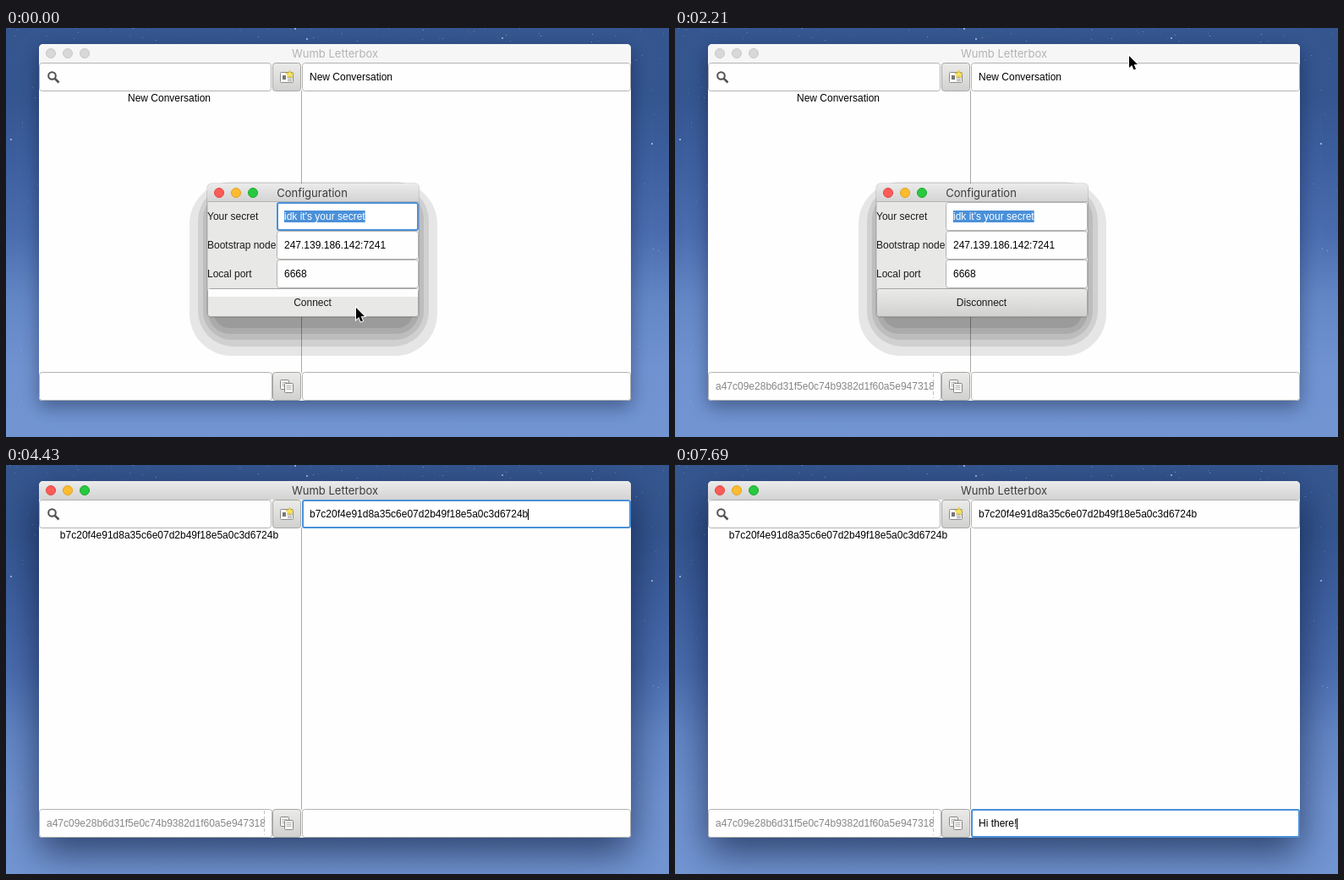
Animation, 784 px wide and 484 px high, one loop 8 s. Source, as an HTML page with a canvas:

```html
<!DOCTYPE html>
<html lang="en">
<head>
<meta charset="utf-8">
<title>Messenger demo</title>
<style>
html, body { margin: 0; width: 100%; height: 100%; overflow: hidden; }
canvas { display: block; }
</style>
</head>
<body>
<canvas id="stage" width="784" height="484"></canvas>
<script>
const ctx = document.getElementById('stage').getContext('2d');
const LOOP = 8000;
const BODY = '12px "Liberation Sans", Arial, sans-serif';
const TITLE = '13px Inter, Roboto, sans-serif';
const BLUE = '#4a90d9';
const APP = 'Wumb Letterbox';
const NODE = '247.139.186.142:7241';
const OWN_KEY = 'a47c09e28b6d31f5e0c74b9382d1f60a5e947318';
const PEER_KEY = 'b7c20f4e91d8a35c6e07d2b49f18e5a0c3d6724b';
const NEW = 'New Conversation';

// [start, x, y, kind]
const pointerSteps = [
  [0, 414, 331, 'arrow'],
  [1330, 425, 349, 'arrow'], [1480, 455, 325, 'arrow'], [1620, 510, 250, 'arrow'],
  [1770, 548, 165, 'arrow'], [1920, 555, 90, 'arrow'], [2060, 545, 48, 'arrow'],
  [2210, 537, 33, 'arrow'],
  [2800, 532, 38, 'arrow'], [2950, 524, 55, 'beam'], [3100, 519, 62, 'beam'],
  [3390, 457, 59, 'beam'], [3540, 395, 60, 'beam'], [3680, 335, 60, 'beam'],
  [3830, 316, 60, 'beam'], [3980, 312, 60, 'beam'],
  [4430, 0, 0, 'none'],
  [5020, 326, 130, 'arrow'], [5170, 350, 300, 'arrow'], [5320, 366, 407, 'arrow'],
  [5470, 366, 421, 'beam'],
  [6350, 0, 0, 'none']
];

// [start, typed text]
const typing = [
  [0, ''], [6350, 'H'], [6500, 'Hi'], [6650, 'Hi t'], [6790, 'Hi th'],
  [6940, 'Hi ther'], [7090, 'Hi there'], [7690, 'Hi there!']
];

const stepAt = (steps, t) => steps.filter(s => s[0] <= t).pop();

function gradient(y0, y1, ...colors) {
  const g = ctx.createLinearGradient(0, y0, 0, y1);
  colors.forEach((c, i) => g.addColorStop(i / (colors.length - 1), c));
  return g;
}

function box(x, y, w, h, r, fill, stroke, width = 1) {
  ctx.beginPath();
  ctx.roundRect(x, y, w, h, r);
  if (fill) { ctx.fillStyle = fill; ctx.fill(); }
  if (stroke) { ctx.strokeStyle = stroke; ctx.lineWidth = width; ctx.stroke(); }
}

function line(color, width, ...pts) {
  ctx.beginPath();
  pts.forEach(([x, y]) => ctx.lineTo(x, y));
  ctx.strokeStyle = color;
  ctx.lineWidth = width;
  ctx.stroke();
}

function text(str, x, y, color = '#000', align = 'left', font = BODY) {
  ctx.font = font;
  ctx.textAlign = align;
  ctx.fillStyle = color;
  ctx.fillText(str, x, y);
}

function entry(x, y, w, h, focused) {
  if (focused) box(x + 1, y + 1, w - 2, h - 2, 2, '#fff', BLUE, 2);
  else box(x + .5, y + .5, w - 1, h - 1, 3, '#fefefe', '#b2b2b0');
}

function button(x, y, w, h, fill) {
  box(x + .5, y + .5, w - 1, h - 1, 3, fill || gradient(y, y + h, '#ebebea', '#dededd', '#d0d1cf'), '#a5a6a4');
}

function selected(str, x, baseline) {
  ctx.font = BODY;
  ctx.fillStyle = BLUE;
  ctx.fillRect(x, baseline - 11, ctx.measureText(str).width, 14);
  text(str, x, baseline, '#fff');
}

function caret(x, y) {
  ctx.fillStyle = '#000';
  ctx.fillRect(Math.round(x), y, 1, 13);
}

function lights(x, y, active) {
  const fills = active ? ['#fc5b57', '#fdbc2e', '#28c840'] : ['#d8d8d8', '#d8d8d8', '#d8d8d8'];
  const rims = active ? ['#e2463f', '#e0a123', '#1aab29'] : ['#c8c8c8', '#c8c8c8', '#c8c8c8'];
  fills.forEach((f, i) => box(x + i * 20 - 5.5, y - 5.5, 11, 11, 5.5, f, rims[i]));
}

function sky() {
  ctx.fillStyle = gradient(0, 484, '#35558f', '#34558f', '#3e5f9f', '#4a6cae', '#6386c5', '#7092d0', '#7295d2');
  ctx.fillRect(0, 0, 784, 484);
  let seed = 29;
  const rnd = () => (seed = (seed * 16807) % 2147483647) / 2147483647;
  for (let i = 0; i < 420; i++) {
    const x = rnd() * 784, y = rnd() * rnd() * 450, a = rnd();
    ctx.fillStyle = `rgba(200,218,250,${.1 + .6 * a * a * a})`;
    const size = a > .94 ? 2 : 1;
    ctx.fillRect(Math.floor(x), Math.floor(y), size, size);
  }
}

function contactIcon() {
  box(324.5, 52.5, 15, 12, 1, '#fafafa', '#8b8c8a');
  ctx.fillStyle = '#777';
  ctx.fillRect(327, 56, 4, 5);
  for (const y of [58.5, 60.5, 62.5]) line('#999', 1, [333, y], [338, y]);
  ctx.beginPath();
  for (let i = 0; i < 10; i++) {
    const r = i % 2 ? 2.2 : 5, a = i * Math.PI / 5 - Math.PI / 2;
    ctx.lineTo(335.5 + r * Math.cos(a), 55 + r * Math.sin(a));
  }
  ctx.closePath();
  ctx.fillStyle = '#f8e45c';
  ctx.fill();
  ctx.strokeStyle = '#d8bd28';
  ctx.lineWidth = .7;
  ctx.stroke();
}

function copyIcon() {
  for (const [x, y] of [[324.5, 416.5], [329.5, 420.5]]) {
    box(x, y, 10, 11, 1, '#f8f8f8', '#858684');
    for (let i = 0; i < 3; i++) line('#b4b5b3', 1, [x + 2, y + 3 + i * 2], [x + 8, y + 3 + i * 2]);
  }
}

function mainWindow(t) {
  const active = t >= 2510;
  ctx.save();
  ctx.shadowColor = active ? 'rgba(0,10,40,.6)' : 'rgba(0,10,40,.4)';
  ctx.shadowBlur = active ? 46 : 22;
  ctx.shadowOffsetY = active ? 18 : 8;
  box(39, 19, 700, 422, [5, 5, 4, 4], '#fefefe');
  ctx.restore();

  box(39, 19, 700, 22, [5, 5, 0, 0], active ? gradient(19, 41, '#ebebeb', '#d3d3d3') : '#f6f6f6');
  lights(53, 30, active);
  text(APP, 389, 35, active ? '#3b3b3b' : '#b3b3b3', 'center', TITLE);

  const pasted = t >= 4430;
  const topFocus = t >= 3390 && t < 5610;
  const bottomFocus = t >= 5610;

  line('#a9a9a7', 1, [349.5, 74], [349.5, 408]);
  entry(39, 41, 275, 34);
  ctx.beginPath();
  ctx.arc(54.5, 56.5, 4.3, 0, 7);
  ctx.strokeStyle = '#505050';
  ctx.lineWidth = 2;
  ctx.stroke();
  line('#505050', 2.6, [57.8, 59.8], [62.5, 64.5]);
  button(315, 41, 34, 34);
  contactIcon();

  entry(350, 41, 389, 34, topFocus);
  const title = pasted ? PEER_KEY : NEW;
  if (t >= 3680 && !pasted) {
    selected(NEW, 359, 62);
  } else {
    text(title, 359, 62);
    if (t >= 3540 && !pasted) {
      ctx.save();
      ctx.beginPath();
      ctx.rect(395, 45, 80, 25);
      ctx.clip();
      selected(NEW, 359, 62);
      ctx.restore();
    }
  }
  if (t >= 4430 && t < 5020) caret(617, 52);
  text(title, 193, 87, '#000', 'center');

  entry(39, 407, 276, 34);
  if (t >= 450) {
    ctx.save();
    ctx.beginPath();
    ctx.rect(46, 410, 260, 28);
    ctx.clip();
    text(OWN_KEY, 48, 428, '#868785');
    ctx.restore();
    ctx.setLineDash([4, 3]);
    line('#c2c2c0', 1, [305.5, 409], [305.5, 438]);
    ctx.setLineDash([]);
  }
  button(315, 407, 34, 34);
  copyIcon();
  entry(350, 407, 389, 34, bottomFocus);
  if (bottomFocus) {
    const typed = stepAt(typing, t)[1];
    text(typed, 359, 428);
    caret(359 + ctx.measureText(typed).width, 418);
  }
}

function dialog(t) {
  ctx.save();
  ctx.beginPath();
  ctx.rect(40, 75, 698, 332);
  ctx.clip();
  const bands = [[217, 182, 293, 206, 50], [227, 186, 273, 191, 42], [233, 192, 261, 177, 34],
    [239, 200, 249, 162, 26], [246, 210, 235, 145, 18]];
  for (const [x, y, w, h, r] of bands) box(x, y, w, h, r, 'rgba(0,0,0,.095)');
  ctx.restore();

  box(238, 184, 250.5, 158, [5, 5, 3, 3], '#e8e8e7', 'rgba(0,0,0,.22)');
  box(238, 184, 250.5, 22, [5, 5, 0, 0], gradient(184, 206, '#ebebeb', '#d3d3d3'));
  line('#b4b4b4', 1, [238, 205.5], [488, 205.5]);
  lights(252, 195, true);
  text('Configuration', 362, 200, '#3b3b3b', 'center', TITLE);

  const rows = [['Your secret', "idk it's your secret"], ['Bootstrap node', NODE], ['Local port', '6668']];
  rows.forEach(([label, value], i) => {
    const y = 206 + i * 34;
    text(label, 238, y + 21, '#1a1a1a');
    entry(320, y, 168, 34, i === 0 && t < 300);
    if (i) text(value, 329, y + 21);
    else selected(value, 329, y + 21);
  });

  let fill = null;
  if (t < 300) fill = '#e8e8e7';
  else if (t < 450) fill = '#d2d3d1';
  else if (t < 1330) fill = '#e8e8e7';
  button(238, 308, 250, 34, fill);
  if (t < 300) {
    ctx.fillStyle = '#fdfdfd';
    ctx.fillRect(239, 309, 248, 9);
  }
  text(t < 450 ? 'Connect' : 'Disconnect', 362.5, 329, '#1a1a1a', 'center');
}

function arrow(x, y) {
  ctx.beginPath();
  [[0, 0], [0, 14], [3.2, 11], [5.6, 16.4], [8, 15.4], [5.7, 10.2], [10, 10]]
    .forEach(([dx, dy]) => ctx.lineTo(x + dx, y + dy));
  ctx.closePath();
  ctx.strokeStyle = '#fff';
  ctx.lineWidth = 2;
  ctx.stroke();
  ctx.fillStyle = '#000';
  ctx.fill();
}

function beam(x, y) {
  for (const [color, w] of [['#fff', 2.6], ['#111', 1.2]]) {
    line(color, w, [x - 3, y - 7.5], [x - 1, y - 7.5], [x + .5, y - 6], [x + .5, y + 6], [x - 1, y + 7.5], [x - 3, y + 7.5]);
    line(color, w, [x + 4, y - 7.5], [x + 2, y - 7.5], [x + .5, y - 6]);
    line(color, w, [x + 4, y + 7.5], [x + 2, y + 7.5], [x + .5, y + 6]);
    line(color, w, [x - 1.5, y + 3.5], [x + 2.5, y + 3.5]);
  }
}

function draw(t) {
  sky();
  mainWindow(t);
  if (t < 2510) dialog(t);
  const [, x, y, kind] = stepAt(pointerSteps, t);
  if (kind === 'arrow') arrow(x, y);
  if (kind === 'beam') beam(x, y);
}

const start = performance.now();
function tick() {
  draw((performance.now() - start) % LOOP);
  requestAnimationFrame(tick);
}
tick();
</script>
</body>
</html>
```
